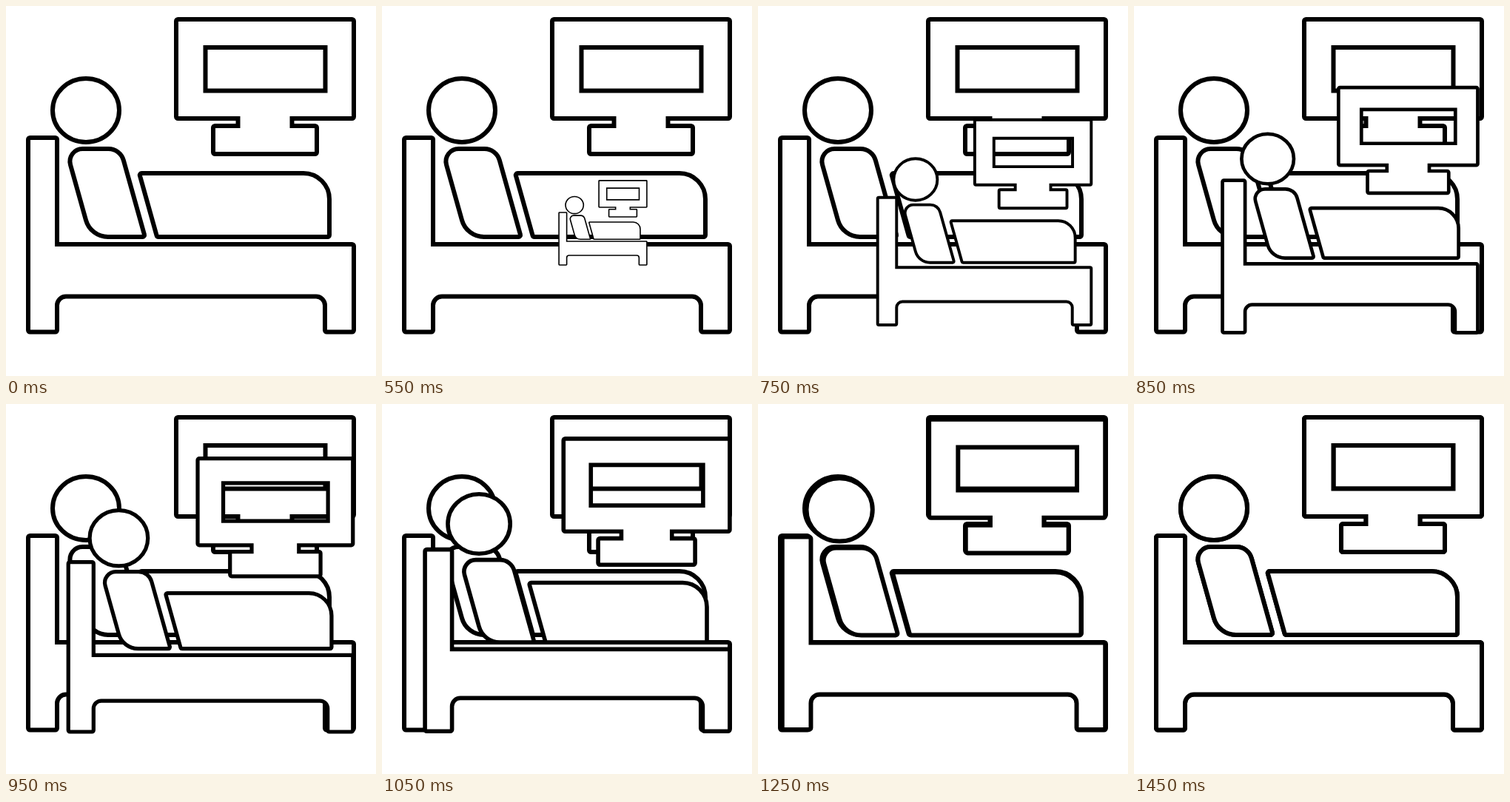
Write an HTML page with a canvas that moves like this. It is 500x500 px and loops after 1470 ms.

```html
<!DOCTYPE html>
<html lang="en">
<head>
<meta charset="utf-8">
<style>
  html, body { margin: 0; width: 100%; height: 100%; overflow: hidden; background: #fff; }
  canvas { display: block; }
</style>
</head>
<body>
<canvas width="500" height="500"></canvas>
<script>
const ctx = document.querySelector('canvas').getContext('2d');
const SIZE = 500, LOOP = 1470, STEP = 100, STEPS = 10, START = 450;
const CORNER = 2.5, LEAN = 0.28;

const corner = (x, y, r = CORNER) => ({ x, y, r });

// Outline symmetric about a vertical axis, from half-widths and heights.
function mirrored(axis, half) {
  const side = sign => half.map(({ x, y, r }) => corner(axis + sign * x, y, r));
  return [...side(1), ...side(-1).reverse()];
}

// Block whose left edge leans, and whose right edge leans by its own slope.
function leaning(left, right, top, bottom, rightLean, [tl, tr, br, bl]) {
  const height = bottom - top;
  return [
    corner(left, top, tl), corner(right, top, tr),
    corner(right + rightLean * height, bottom, br),
    corner(left + LEAN * height, bottom, bl)
  ];
}

function rounded(corners) {
  const path = new Path2D();
  const [a, b] = corners;
  path.moveTo((a.x + b.x) / 2, (a.y + b.y) / 2);
  for (let i = 1; i <= corners.length; i++) {
    const { x, y, r } = corners[i % corners.length];
    const next = corners[(i + 1) % corners.length];
    path.arcTo(x, y, next.x, next.y, r);
  }
  path.closePath();
  return path;
}

const head = new Path2D();
head.ellipse(108, 141, 45, 43, 0, 0, Math.PI * 2);

const torso = rounded(leaning(81, 154.5, 193, 312, LEAN, [17, 21, CORNER, 31]));
const blanket = rounded(leaning(180, 437, 226, 312, 0, [CORNER, 35, CORNER, CORNER]));

const legs = mirrored(250, [corner(220, 440.5), corner(181, 440.5), corner(181, 392.5, 12)]);
const bed = rounded([
  corner(30, 178), corner(69, 178), corner(69, 322, 0), corner(470, 322), ...legs
]);

const monitor = rounded(mirrored(350, [
  corner(120, 18), corner(120, 152), corner(36.5, 152, 0),
  corner(36.5, 162, 0), corner(70, 162), corner(70, 200)
]));
monitor.rect(269.5, 56, 162, 58.5);

const shapes = [head, torso, blanket, bed, monitor];

function drawScene(growth) {
  // The copy keeps whole-pixel size and position.
  const scale = Math.floor(SIZE * growth) / SIZE;
  const shift = Math.floor(SIZE / 2 * (1 - growth * growth));
  ctx.setTransform(scale, 0, 0, scale, shift, shift);
  for (const shape of shapes) {
    ctx.fill(shape, 'evenodd'); // the screen stays see-through
    ctx.stroke(shape);
  }
}

function render(time) {
  const step = Math.min(STEPS, Math.floor((time - START) / STEP));
  ctx.setTransform(1, 0, 0, 1, 0, 0);
  ctx.fillStyle = '#fff';
  ctx.strokeStyle = '#000';
  ctx.lineWidth = 6;
  ctx.fillRect(0, 0, SIZE, SIZE);
  drawScene(1);
  if (step > 0) drawScene(1 - (1 - step / STEPS) ** 3);
}

const begin = performance.now();
function tick() {
  render((performance.now() - begin) % LOOP);
  requestAnimationFrame(tick);
}
tick();
</script>
</body>
</html>
```
